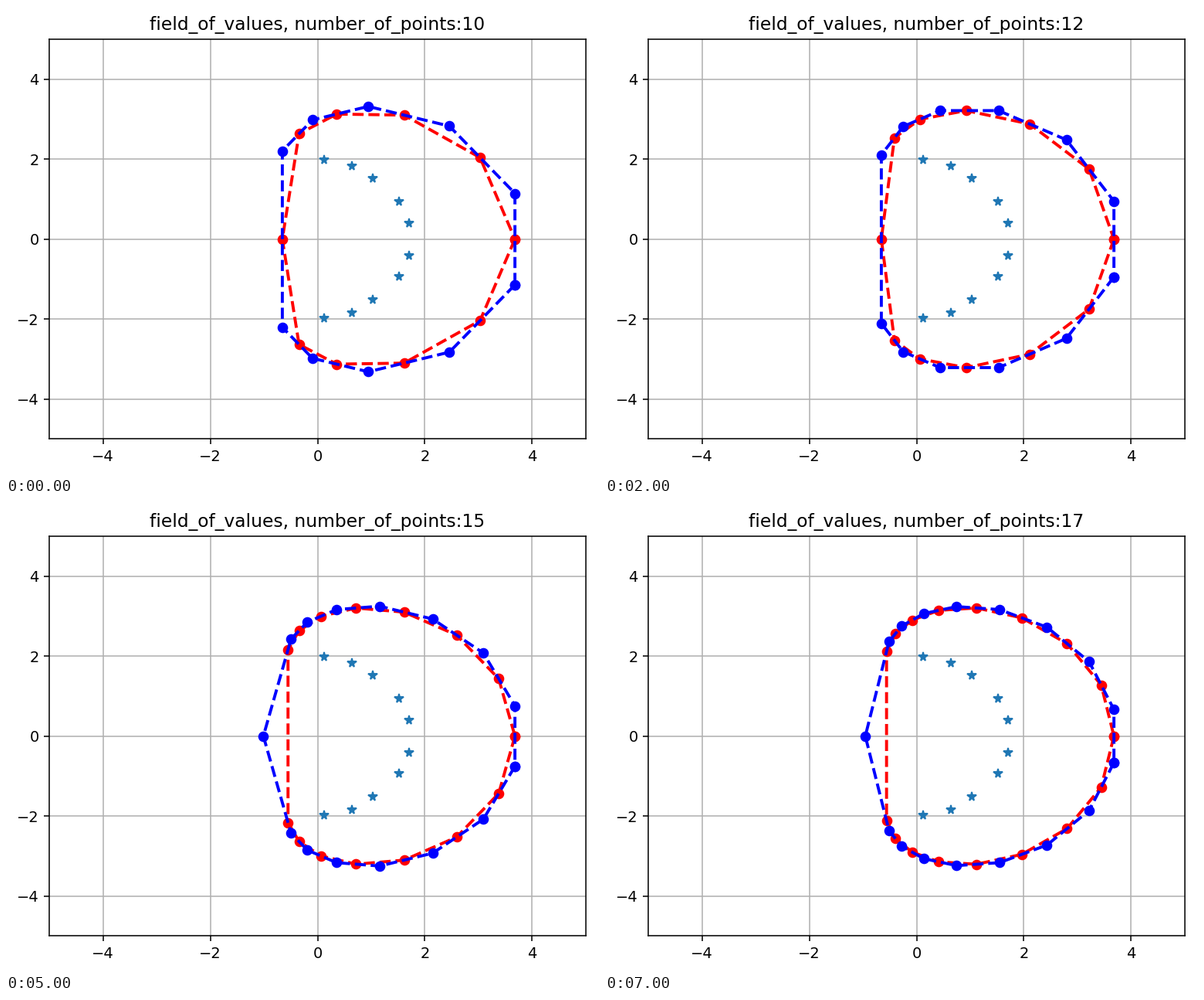
A matplotlib script for the animation above (8000 ms loop, 768 by 607 pixels).

```python
import numpy as np
import matplotlib.pyplot as plt
from matplotlib.animation import FuncAnimation

W, H, DPI = 768, 607, 140
LEFT, TOP = 56.3, 43.0
AX_W, AX_H = 694.4, 517.4
FIRST, STEPS = 10, 8


def grcar(n, k):
    """Toeplitz matrix: -1 below the diagonal, ones on it and k bands above."""
    a = -np.eye(n, k=-1)
    for j in range(k + 1):
        a += np.eye(n, k=j)
    return a


def support(a, theta):
    """Largest eigenvalue of the rotated Hermitian part and its boundary point."""
    r = np.exp(1j * theta) * a
    vals, vecs = np.linalg.eigh((r + r.conj().T) / 2)
    x = vecs[:, -1]
    return vals[-1], x.conj() @ a @ x


def polygons(a, n):
    """Inscribed and circumscribed polygons of the field of values, closed."""
    step = 2 * np.pi / n
    theta = step * np.arange(n)
    lam, inner = map(np.array, zip(*(support(a, t) for t in theta)))
    slide = (lam * np.cos(step) - np.roll(lam, -1)) / np.sin(step)
    outer = np.exp(-1j * theta) * (lam + 1j * slide)
    return [np.append(p, p[0]) for p in (inner, outer)]


A = grcar(10, 5)
eigs = np.linalg.eigvals(A)

fig = plt.figure(figsize=((W + 0.001) / DPI, (H + 0.001) / DPI), dpi=DPI,
                 facecolor="white")
ax = fig.add_axes([LEFT / W, 1 - (TOP + AX_H) / H, AX_W / W, AX_H / H])
ax.set(xlim=(-5, 5), ylim=(-5, 5),
       xticks=range(-4, 5, 2), yticks=range(-4, 5, 2))
ax.grid(True)
title = ax.set_title("")

ax.plot(eigs.real, eigs.imag, "*", color="tab:blue")
lines = [ax.plot([], [], "o--", color=c, lw=2)[0] for c in ("red", "blue")]


def update(i):
    n = FIRST + i
    for line, p in zip(lines, polygons(A, n)):
        line.set_data(p.real, p.imag)
    title.set_text(f"field_of_values, number_of_points:{n}")
    return [*lines, title]


anim = FuncAnimation(fig, update, frames=STEPS, interval=1000,
                     repeat=True, repeat_delay=0)
plt.show()
```
